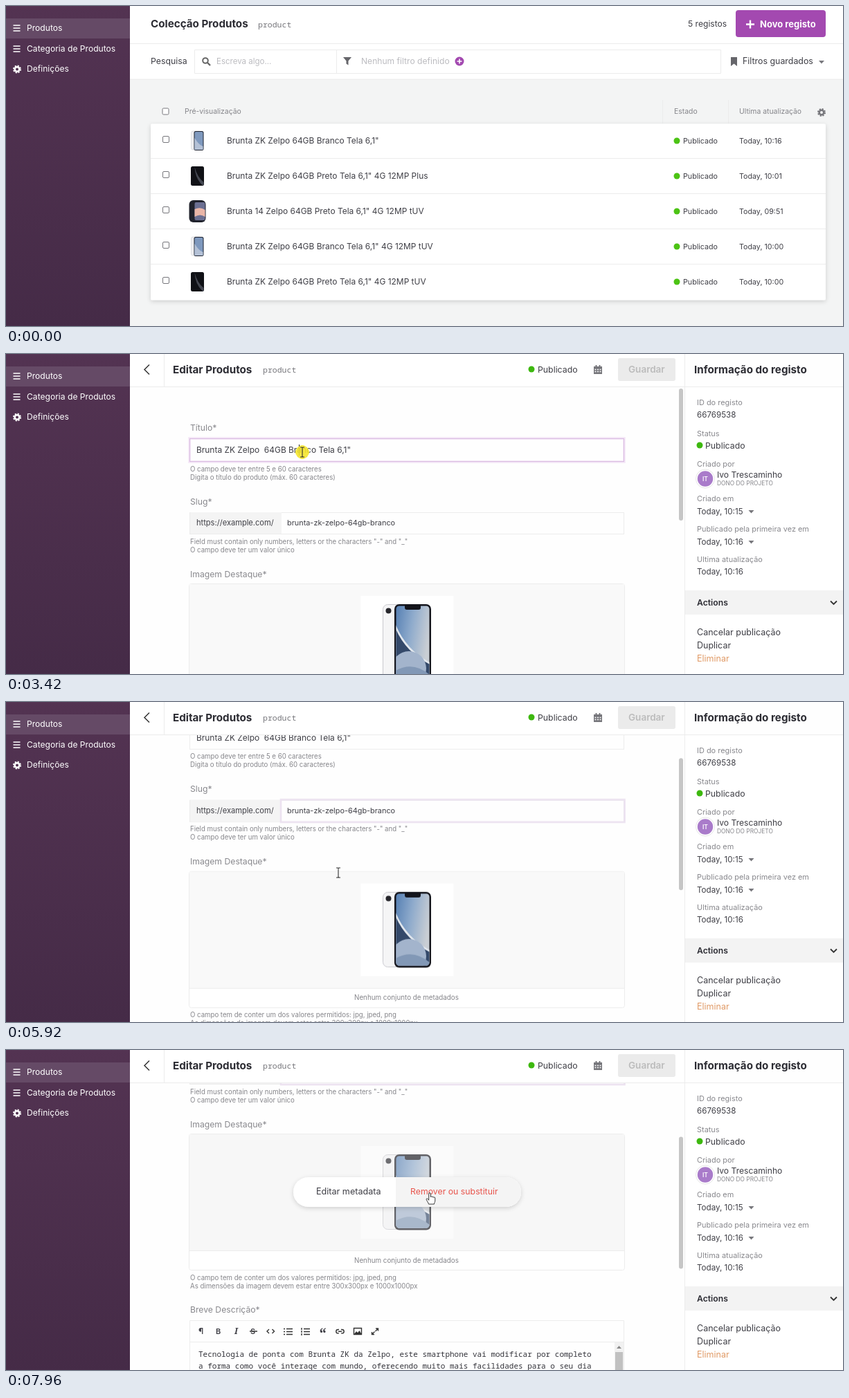
Animation, 1209 px wide and 463 px high, one loop 8 s. Source, as an HTML page:

```html
<!DOCTYPE html>
<html lang="pt">
<head>
<meta charset="utf-8">
<title>Editar Produtos</title>
<style>
@property --s { syntax: "<number>"; inherits: true; initial-value: 0; }
html, body { margin: 0; height: 100%; overflow: hidden; background: #fff; }
svg { display: block; width: 100vw; height: 100vh; }
text { font: 12.1px Inter, "Noto Sans", sans-serif; fill: #3f3f46; white-space: pre; }
.h { font-size: 15.2px; font-weight: 700; fill: #2c2c33; }
.b { font-weight: 600; }
.row { font-size: 11.95px; }
.sm { font-size: 10.7px; }
.col { font-size: 10.4px; fill: #85858a; }
.lab { font-size: 10.95px; fill: #88888d; }
.fl { font-size: 12.2px; fill: #88888d; }
.tip { font-size: 9.65px; fill: #85858a; }
.val { font-size: 11.6px; }
.act { font-size: 12.5px; }
.mono { font: 11.5px "Roboto Mono", "Noto Sans Mono", monospace; fill: #77777c; }
.code { font: 11px "Roboto Mono", "Noto Sans Mono", monospace; fill: #33333a; }
.ph { fill: #bcbcc0; }
.w { fill: #fff; }
.line { stroke: #ececec; fill: none; }
.ic { stroke: #333; stroke-width: 1.4; fill: none; }

#list, #edit, #form, #panel, #blur, #load, .av, #ring1, #ring2, #car1, #car2, #car3, #pop,
#cur, #click, #arrow, #beam, #hand, #r0, #r1, #meta, #rem, #remBg {
  animation: 8s linear infinite;
}
#list { animation-name: list; animation-timing-function: step-end; }
#edit { animation-name: edit, scroll; animation-timing-function: step-end, linear; }
#form, #panel { animation-name: fade; }
#load, .av { animation-name: load; }
#blur { animation-name: blur; }
#scroll { transform: translateY(calc(var(--s) * -1px)); }
#thumb { transform: translateY(calc(var(--s) * .358px)); }
#ring1 { animation-name: ring1; }
#ring2 { animation-name: ring2; }
#car1 { animation-name: car1; }
#car2 { animation-name: car2; }
#car3 { animation-name: car3; }
#pop { animation-name: pop; }
#cur { animation-name: move; }
#click { animation-name: click; }
#arrow { animation-name: arrow; }
#beam { animation-name: beam; }
#hand { animation-name: hand; }
#r0 { animation-name: row0; }
#r1 { animation-name: row1; }
#meta { animation-name: meta; }
#rem { animation-name: rem; }
#remBg { animation-name: remBg; }
#car1, #car2, #car3, #arrow, #beam, #hand { animation-timing-function: step-end; }

@keyframes list { 0% { opacity: 1 } 21.6%, 100% { opacity: 0 } }
@keyframes edit { 0% { opacity: 0 } 21.6%, 100% { opacity: 1 } }
@keyframes fade { 0%, 21.6% { opacity: 0 } 24.8%, 100% { opacity: 1 } }
@keyframes load { 0%, 26.2% { opacity: 0 } 28.4%, 100% { opacity: 1 } }
@keyframes blur { 0%, 26.2% { opacity: 1 } 28.4%, 100% { opacity: 0 } }
@keyframes scroll {
  0%, 71.6% { --s: 0 } 72.25% { --s: 20 } 73.1% { --s: 55 } 74% { --s: 87 }
  75.2% { --s: 109 } 77.5% { --s: 156 } 79.88% { --s: 202 } 81.75%, 100% { --s: 211 }
}
@keyframes ring1 { 0%, 41.4% { opacity: 0 } 42.7%, 59.4% { opacity: 1 } 61.1%, 100% { opacity: 0 } }
@keyframes ring2 { 0%, 59.4% { opacity: 0 } 61.2%, 100% { opacity: 1 } }
@keyframes car1 { 0% { opacity: 0 } 41.9% { opacity: 1 } 49.37% { opacity: 0 } 56% { opacity: 1 } 59.4%, 100% { opacity: 0 } }
@keyframes car2 { 0% { opacity: 0 } 59.4% { opacity: 1 } 66%, 100% { opacity: 0 } }
@keyframes car3 { 0% { opacity: 0 } 66.4% { opacity: 1 } 73% { opacity: 0 } 79.6%, 100% { opacity: 1 } }
@keyframes pop { 0%, 79% { opacity: 0 } 79.88% { opacity: .3 } 81.75%, 100% { opacity: 1 } }
@keyframes move {
  0%, 6.25% { transform: translate(430px, 359px) }
  7.88%, 10.38% { transform: translate(428px, 266px) }
  12.13%, 21.6% { transform: translate(428px, 211px) }
  24.8%, 34.25% { transform: translate(419px, 198px) }
  38.75%, 51.9% { transform: translate(428px, 142px) }
  57.5%, 62% { transform: translate(418px, 238px) }
  63.5% { transform: translate(411px, 222px) }
  66%, 72% { transform: translate(480px, 245px) }
  74% { transform: translate(480px, 247px) }
  77%, 89.5% { transform: translate(479px, 247px) }
  99.4%, 100% { transform: translate(612px, 207px) }
}
@keyframes click {
  0%, 14.62%, 16.36%, 41.87%, 43.6%, 59.37%, 61.1%, 66.37%, 68.06%, 100% { opacity: 0; transform: scale(1.4) }
  14.63%, 41.88%, 59.38%, 66.38% { opacity: .9; transform: scale(1.4) }
  16.35%, 43.59%, 61.09%, 68.05% { opacity: .9; transform: scale(.55) }
}
@keyframes hand { 0% { opacity: 0 } 6.25% { opacity: 1 } 21.6% { opacity: 0 } 94.6%, 100% { opacity: 1 } }
@keyframes arrow {
  0% { opacity: 0 } 21.6% { opacity: 1 } 37.6% { opacity: 0 } 52.7% { opacity: 1 }
  56.9% { opacity: 0 } 78% { opacity: 1 } 94.6%, 100% { opacity: 0 }
}
@keyframes beam { 0% { opacity: 0 } 37.6% { opacity: 1 } 52.7% { opacity: 0 } 56.9% { opacity: 1 } 78%, 100% { opacity: 0 } }
@keyframes row0 { 0%, 10.6% { fill: #3f3f46 } 12.1%, 100% { fill: #222228 } }
@keyframes row1 { 0%, 6.6% { fill: #3f3f46 } 7.8%, 10.6% { fill: #222228 } 12.1%, 100% { fill: #3f3f46 } }
@keyframes meta { 0%, 94.6% { fill: #3f3f46 } 95.3%, 96% { fill: #a349b0 } 97%, 100% { fill: #3f3f46 } }
@keyframes rem { 0%, 96% { fill: #3f3f46 } 97.6%, 100% { fill: #e8554d } }
@keyframes remBg { 0%, 96% { fill: #fff } 97.6%, 100% { fill: #f4f4f4 } }
</style>
</head>
<body>
<svg viewBox="0 0 1209 463" preserveAspectRatio="none">
  <defs>
    <linearGradient id="side" x2="0" y2="1"><stop stop-color="#533352"/><stop offset="1" stop-color="#452b47"/></linearGradient>
    <linearGradient id="screen" x2="1" y2=".35"><stop stop-color="#557fb3"/><stop offset=".5" stop-color="#8fabcc"/><stop offset="1" stop-color="#c9ced4"/></linearGradient>
    <linearGradient id="band"><stop offset=".2" stop-color="#fdfdfc"/><stop offset=".42" stop-color="#cacad4"/><stop offset=".56" stop-color="#bcbcca"/><stop offset=".7" stop-color="#cacad4"/><stop offset=".95" stop-color="#fdfdfc"/></linearGradient>
    <radialGradient id="core"><stop stop-color="#646a9c"/><stop offset=".35" stop-color="#7b80ac" stop-opacity=".85"/><stop offset="1" stop-color="#b4b6cc" stop-opacity="0"/></radialGradient>
    <filter id="soft" x="-10%" y="-40%" width="120%" height="190%"><feDropShadow dx="0" dy="2" stdDeviation="3" flood-opacity=".16"/></filter>
    <clipPath id="glass"><rect x="563.5" y="364.5" width="48" height="104" rx="4.5"/></clipPath>
    <g id="gear"><circle r="3.3" fill="none" stroke="currentColor" stroke-width="2.6"/><circle r="5" fill="none" stroke="currentColor" stroke-width="2" stroke-dasharray="2.2 1.727"/></g>
    <path id="bars" d="M0 0h10M0 4h10M0 8h10" stroke="#fff" stroke-width="1.6"/>
    <path id="down" d="M0 0h8l-4 4.5z" fill="#77777c"/>
    <g id="white"><rect x="-9" y="-14" width="14" height="27" rx="2.5" fill="#efeff1" stroke="#d2d2d6" stroke-width=".6"/><rect x="-5" y="-14" width="14" height="28" rx="2.5" fill="#1d2230"/><rect x="-4" y="-13" width="12" height="26" rx="1.6" fill="#7f99be"/><path d="M-4-4Q2 6 8 8V13H-4z" fill="#b4c1d6"/></g>
    <g id="black"><rect x="-9.5" y="-14" width="19" height="28" rx="2.5" fill="#101116"/><path d="M-4-13Q0 2 9 9V13H7Q-3 4-4-13" fill="#454852"/></g>
    <g id="wide"><rect x="-12" y="-16" width="24" height="32" rx="6" fill="#20222c"/><rect x="-4" y="-13" width="15" height="26" rx="2" fill="#6b6f92"/><path d="M-4-3Q4-7 11-2V8Q4 3-4 8z" fill="#eab6a8"/></g>
  </defs>

  <g id="list">
    <path d="M179 0h1030v463H179z" fill="#f3f4f4"/>
    <path d="M179 0h1030v106H179z" fill="#fff"/>
    <path class="line" d="M179 54.5h1030M272.5 63.5h760v34h-760zM477.5 63.5v34M179 106h1030M948.5 136v34M1043.5 136v34"/>
    <text class="h" x="209" y="31">Colecção Produtos</text>
    <text class="mono" x="364" y="31">product</text>
    <text x="985" y="30">5 registos</text>
    <rect x="1054" y="6" width="130" height="39" rx="4" fill="#a349b0"/>
    <path d="M1069 26.5h12M1075 20.5v12" stroke="#fff" stroke-width="2.4"/>
    <text class="w" style="font-size:13px;font-weight:700" x="1089" y="31">Novo registo</text>
    <text x="209" y="84" style="font-size:12.3px">Pesquisa</text>
    <circle cx="288" cy="79" r="3.8" fill="none" stroke="#666" stroke-width="2"/>
    <path d="M291 82l4 4" stroke="#666" stroke-width="2.4"/>
    <text class="ph" x="304" y="84" style="font-size:11.5px">Escreva algo...</text>
    <path d="M487 74h12l-4.5 5.5v6l-3-2v-4z" fill="#66666b"/>
    <text class="ph" x="513" y="84">Nenhum filtro definido</text>
    <circle cx="655" cy="80" r="6.5" fill="#a349b0"/><path d="M651.5 80h7M655 76.5v7" stroke="#fff" stroke-width="1.6"/>
    <path d="M1047 74h9v13l-4.5-3.5-4.5 3.5z" fill="#66666b"/>
    <text x="1064" y="84" style="font-size:12.4px">Filtros guardados</text>
    <use href="#down" x="1174" y="79"/>
    <rect x="226" y="148" width="9" height="9" rx="1.5" fill="#fff" stroke="#77777c"/>
    <text class="col" x="258" y="156">Pré-visualização</text>
    <text class="col" x="965" y="156">Estado</text>
    <text class="col" x="1059" y="156">Ultima atualização</text>
    <use href="#gear" x="1178" y="154" color="#77777c"/>
    <rect x="209" y="170.5" width="975" height="255" rx="2" fill="#fff" filter="url(#soft)"/>
    <g id="rows"></g>
  </g>

  <g id="edit">
    <path d="M179 0h1030v463H179z" fill="#fefefe"/>
    <g id="form"><g id="scroll">
      <text class="fl" x="266" y="111">Título*</text>
      <rect class="line" x="265.5" y="122.5" width="627" height="33"/>
      <g id="ring1" fill="none"><rect x="265" y="122" width="628" height="34" stroke="#f3e5f6" stroke-width="3.5"/><rect x="265.5" y="122.5" width="627" height="33" stroke="#d9bbe1"/></g>
      <text class="row" x="275" y="143">Brunta ZK Zelpo  64GB Branco Tela 6,1"</text>
      <path id="car1" d="M423.5 131v16" stroke="#222"/>
      <text class="tip" x="266" y="169.5">O campo deve ter entre 5 e 60 caracteres</text>
      <text class="tip" x="266" y="181.5">Digita o título do produto (máx. 60 caracteres)</text>

      <text class="fl" x="266" y="217.5">Slug*</text>
      <rect class="line" x="265.5" y="229.5" width="627" height="31"/>
      <path d="M266 229h132v31H266z" fill="#f4f4f4"/>
      <rect id="ring2" x="397" y="228.5" width="496.5" height="32.5" fill="none" stroke="#ece2f0" stroke-width="2.6"/>
      <text x="275" y="248" style="font-size:11.1px">https://example.com/</text>
      <text x="406" y="248" style="font-size:10.9px">brunta-zk-zelpo-64gb-branco</text>
      <path id="car2" d="M418.5 237v15" stroke="#222"/>
      <path id="car3" d="M480.5 237v15" stroke="#222"/>
      <text class="tip" x="266" y="274.5">Field must contain only numbers, letters or the characters "-" and "_"</text>
      <text class="tip" x="266" y="286.5">O campo deve ter um valor único</text>

      <text class="fl" x="266" y="322.5">Imagem Destaque*</text>
      <rect x="264.5" y="332.5" width="629" height="197" rx="3" fill="#fff" stroke="#ececec"/>
      <path d="M265 333h628v168H265z" fill="#f9f9f9"/><path class="line" d="M265 501.5h628"/>
      <path d="M512.5 350h134v134h-134z" fill="#fff"/>
      <g id="blur">
        <path d="M512.5 350h134v134h-134z" fill="url(#band)"/>
        <ellipse cx="588" cy="418" rx="44" ry="66" fill="url(#core)"/>
      </g>
      <g id="load">
        <rect x="544.5" y="362.5" width="40" height="108" rx="7" fill="#f5f5f6" stroke="#c9c9ce"/>
        <circle cx="552.5" cy="371.5" r="4" fill="#25252b"/>
        <rect x="561" y="362" width="53" height="109.5" rx="7" fill="#14151c"/>
        <g clip-path="url(#glass)">
          <path d="M563 364h49v105h-49z" fill="url(#screen)"/>
          <path d="M563 392Q578 428 612 446V469H563z" fill="#e3e8ee"/>
          <path d="M563 398Q578 432 612 449V469H563z" fill="#34496a"/>
          <circle cx="582" cy="455" r="25" fill="#a3b4cc"/>
          <path d="M563 458Q588 444 612 464V469H563z" fill="#8298b6"/>
        </g>
        <path d="M576 364h23v3q0 3-3 3h-17q-3 0-3-3z" fill="#14151c"/>
      </g>
      <text class="tip" x="503" y="518.5" style="font-size:9.8px">Nenhum conjunto de metadados</text>
      <text class="tip" x="266" y="543.5">O campo tem de conter um dos valores permitidos: jpg, jped, png</text>
      <text class="tip" x="266" y="555.5">As dimensões da imagem devem estar entre 300x300px e 1000x1000px</text>

      <g id="pop">
        <path d="M265 333h628v168H265z" fill="#f4f4f4" opacity=".35"/>
        <g filter="url(#soft)">
          <rect x="415" y="395" width="329" height="43" rx="21.5" fill="#fff"/>
          <path id="remBg" d="M563 395h159.500a21.500 21.500 0 0 1 0 43H563z"/>
        </g>
        <text id="meta" x="448" y="419.5" style="font-size:12.6px">Editar metadata</text>
        <text id="rem" x="584" y="419.5" style="font-size:12.3px">Remover ou substituir</text>
      </g>

      <text class="fl" x="266" y="591">Breve Descrição*</text>
      <path class="line" d="M265.5 602.5h627v120h-627zM265.5 633.5h627"/>
      <text class="b" x="278" y="622">¶</text>
      <text class="b" x="303" y="622" style="font-size:11px">B</text>
      <text x="330" y="622" style="font:italic 700 12px 'Noto Serif',serif">I</text>
      <text class="b" x="353" y="622" style="font-size:11px">S</text>
      <text x="452.5" y="629" style="font:700 21px 'Noto Serif',serif">“</text>
      <path class="ic" d="M352 618h11M380 615l-3 3 3 3M384.5 615l3 3-3 3M405 614.5h9M405 618.5h9M405 622.5h9M401 614.5h2M401 618.5h2M401 622.5h2M430 614.5h9M430 618.5h9M430 622.5h9M427 613v3M427 617v3M427 621v3M481 615.5h-1.500a2.700 2.700 0 0 0 0 5.400h1.500M484 615.5h1.500a2.700 2.700 0 0 1 0 5.400h-1.500M480 618.2h5M502.5 613.5h11v9h-11zM534 614h3.500v3.500M537 614.5l-3.500 3.500M528.5 619v3.500h3.500M529 622l3.500-3.500"/>
      <path d="M503 622l3-4 2 2 2.500-3 3 5z" fill="#333"/>
      <path d="M879 634h13v100h-13z" fill="#f1f1f1"/><path d="M882 643l3.500-4 3.500 4z" fill="#888"/><path d="M880 648h11v50h-11z" fill="#c1c1c1"/>
      <text class="code" x="278" y="655">Tecnologia de ponta com Brunta ZK da Zelpo, este smartphone vai modificar por completo</text>
      <text class="code" x="278" y="672">a forma como você interage com mundo, oferecendo muito mais facilidades para o seu dia</text>
    </g></g>

    <rect id="thumb" x="972" y="50" width="6" height="191" rx="3" fill="#c6c6c6"/>
    <path d="M179 0h802v48H179z" fill="#fff"/>
    <path class="line" d="M179 47.5h1030M228.5 0v48"/>
    <path d="M207 15.5l-7 7 7 7" stroke="#333" stroke-width="1.5" fill="none"/>
    <text class="h" x="241" y="27.5">Editar Produtos</text>
    <text class="mono" x="371" y="27">product</text>
    <circle cx="759" cy="22" r="4.5" fill="#3db80f"/>
    <text x="768" y="26.5" style="font-size:12.3px">Publicado</text>
    <path d="M849 18h12v11h-12zM851.5 16h2v3h-2zM856.5 16h2v3h-2z" fill="#77777c"/>
    <path d="M850.5 22.5h9M850.5 25.5h9" stroke="#fff" stroke-dasharray="2 1.5" stroke-width="1.5"/>
    <rect x="884" y="6" width="83" height="33" rx="3" fill="#ebebeb"/>
    <text class="b" x="899" y="27" style="font-size:13.5px;fill:#bcbcbc">Guardar</text>

    <g id="panel">
      <path d="M981 48h228v415H981z" fill="#fff"/>
      <path class="line" d="M980.5 0v463"/>
      <text class="h" x="994" y="27.5">Informação do registo</text>
      <text class="lab" x="998" y="74">ID do registo</text>
      <text class="val" x="998" y="92">66769538</text>
      <text class="lab" x="998" y="118.5">Status</text>
      <circle cx="1002" cy="132" r="4.5" fill="#3db80f"/>
      <text x="1010" y="136.5" style="font-size:12.3px">Publicado</text>
      <text class="lab" x="998" y="162.5">Criado por</text>
      <circle cx="1010" cy="180.5" r="13.5" fill="#fff" stroke="#e6e6e6"/>
      <g class="av"><circle cx="1010" cy="180.5" r="11.2" fill="#a97bca"/><text class="b w" x="1010" y="183.7" text-anchor="middle" style="font-size:8.5px">IT</text></g>
      <text x="1027" y="179">Ivo Trescaminho</text>
      <text x="1027" y="190" style="font-size:8.4px;fill:#85858a">DONO DO PROJETO</text>
      <text class="lab" x="998" y="213">Criado em</text>
      <text class="val" x="998" y="231.5">Today, 10:15</text><use href="#down" x="1072.5" y="226"/>
      <text class="lab" x="998" y="257">Publicado pela primeira vez em</text>
      <text class="val" x="998" y="275.5">Today, 10:16</text><use href="#down" x="1072.5" y="270"/>
      <text class="lab" x="998" y="301">Ultima atualização</text>
      <text class="val" x="998" y="319">Today, 10:16</text>
      <path d="M981 342h228v35H981z" fill="#f3f3f3"/>
      <text class="b" x="998" y="363.5" style="font-size:12.2px;fill:#2c2c33">Actions</text>
      <path d="M1191 357.5l4.500 4.500 4.500-4.500" fill="none" stroke="#333" stroke-width="1.8"/>
      <text class="act" x="998" y="407">Cancelar publicação</text>
      <text class="act" x="998" y="425.5">Duplicar</text>
      <text class="act" x="998" y="444.5" style="fill:#e09a66">Eliminar</text>
    </g>
  </g>

  <path d="M0 0h179v463H0z" fill="url(#side)"/>
  <path d="M0 18h179v29H0z" fill="#654a66"/>
  <use href="#bars" x="10.5" y="28"/><use href="#bars" x="10.5" y="58"/>
  <use href="#gear" x="16" y="91.5" color="#fff"/>
  <text class="w" x="30" y="35.5">Produtos</text>
  <text class="w" x="30" y="65.5">Categoria de Produtos</text>
  <text class="w" x="30" y="95">Definições</text>

  <g id="cur">
    <circle id="click" r="10" fill="#f4e52c"/>
    <path id="arrow" d="M0 0V11.300L2.600 9 4.400 12.800 6.200 12 4.500 8.300H8z" fill="#fff" stroke="#222" stroke-width=".9"/>
    <path id="beam" d="M-3-7h2.200L0-6.300.8-7H3M0-6.300V6.300M-3 7h2.200L0 6.300.8 7H3" fill="none" stroke="#333" stroke-width="1.1"/>
    <path id="hand" d="M-1.300 1a1.300 1.300 0 0 1 2.600 0v4.500a1.200 1.200 0 0 1 2.300.4a1.200 1.200 0 0 1 2.200.6a1.100 1.100 0 0 1 2 .6V11c0 2-1.200 2.800-1.400 5H-1.500C-2 13.500-4 11.500-4.800 9.400C-5.300 8-3.500 7.400-2.600 8.600L-1.300 10.300z" fill="#fff" stroke="#222" stroke-width=".9"/>
  </g>
</svg>
<script>
const rows = [
  ["white", "ZK", "Branco", "", "10:16"],
  ["black", "ZK", "Preto", " 4G 12MP Plus", "10:01"],
  ["wide", "14", "Preto", " 4G 12MP tUV", "09:51"],
  ["white", "ZK", "Branco", " 4G 12MP tUV", "10:00"],
  ["black", "ZK", "Preto", " 4G 12MP tUV", "10:00"]
];
document.getElementById("rows").innerHTML = rows.map(([pic, model, tone, extra, time], i) => {
  const y = 195 + i * 51;
  const rule = i ? `<path class="line" d="M209 ${y - 25.5}h975"/>` : "";
  return `${rule}
    <rect x="226.5" y="${y - 6.5}" width="9" height="9" rx="1.5" fill="#fff" stroke="#77777c"/>
    <use href="#${pic}" x="276.5" y="${y}"/>
    <text class="row" id="r${i}" x="319" y="${y + 4}">Brunta ${model} Zelpo 64GB ${tone} Tela 6,1"${extra}</text>
    <circle cx="969" cy="${y}" r="4.5" fill="#4cc314"/>
    <text class="sm" x="978" y="${y + 4}">Publicado</text>
    <text class="sm" x="1059" y="${y + 4}">Today, ${time}</text>`;
}).join("");
</script>
</body>
</html>
```
